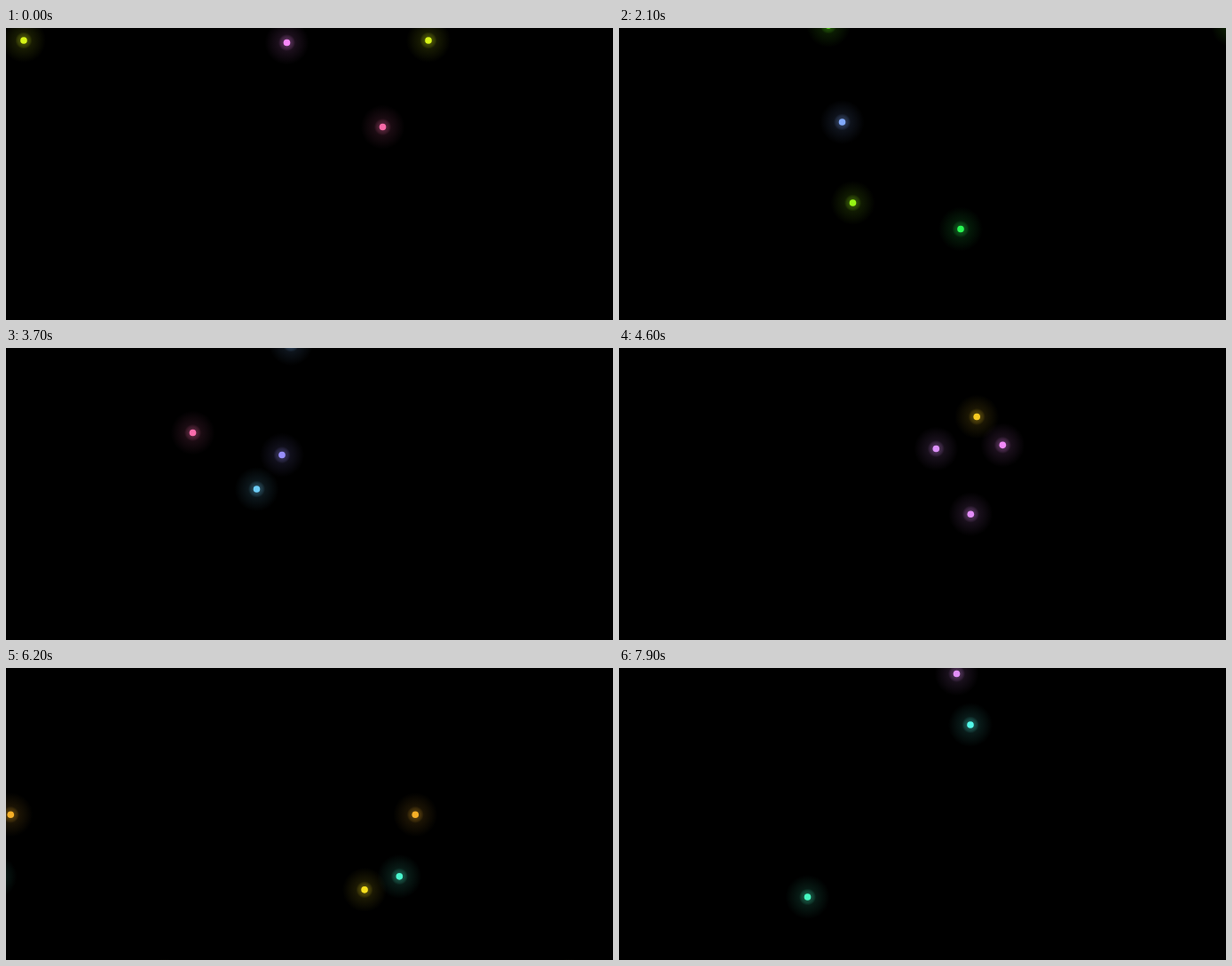
Recreate the animation shown at these times as an HTML page with a canvas. Size 684 by 329 pixels, loop 8000 ms.

```html
<!DOCTYPE html>
<html lang="en">
<head>
<meta charset="utf-8">
<title>Drifting lights</title>
<style>
  html, body { margin: 0; width: 100%; height: 100%; overflow: hidden; background: #000; }
  canvas { display: block; }
</style>
</head>
<body>
<canvas id="stage" width="684" height="329"></canvas>
<script>
const canvas = document.getElementById('stage');
const ctx = canvas.getContext('2d');
const LOOP = 8000, STEP = 100;
const TILE = 456;        // every light is repeated this far to the left
const CORE = 3.8, HALO = 25;
const HUE_RATE = 7.2;    // degrees per step, the same for all lights

// All lights pass their waypoints at the same steps
const times = [0, 10, 20, 36, 55, 66, 78];
const lights = [
  { hue: 80, path: [[476, 14], [550.5, 208.5], [251.5, 106], [210.5, 95.5], [591, 94], [300.5, 316], [380.5, 6.5]] },
  { hue: 310, path: [[316.5, 16.5], [601, 242], [263.5, 197], [282.5, 159], [442.5, 89.5], [438, 236.5], [212.5, 258]] },
  { hue: 340, path: [[424.5, 111.5], [439, 183], [385, 226.5], [311, 120.5], [545, 140.5], [282, 310.5], [396, 64]] },
  { hue: -40, path: [[720, -220], [720, -140], [692, -3], [321, -5], [560, 400], [660, 303], [500, 480]] }
];

const cosDeg = degrees => Math.cos(degrees * Math.PI / 180);

function slope(path, i, axis) {
  const before = Math.max(i - 1, 0), after = Math.min(i + 1, path.length - 1);
  return (path[after][axis] - path[before][axis]) / (times[after] - times[before]);
}

// Cubic Hermite curve through the waypoints
function pointAt(path, step) {
  let i = 0;
  while (i < times.length - 2 && times[i + 1] <= step) i++;
  const span = times[i + 1] - times[i];
  const u = (step - times[i]) / span, v = 1 - u;
  return [0, 1].map(axis =>
    path[i][axis] * v * v * (1 + 2 * u) + path[i + 1][axis] * u * u * (1 + 2 * v) +
    span * u * v * (slope(path, i, axis) * v - slope(path, i + 1, axis) * u));
}

function disc(x, y, radius, fill) {
  ctx.fillStyle = fill;
  ctx.beginPath();
  ctx.arc(x, y, radius, 0, 2 * Math.PI);
  ctx.fill();
}

function drawLight(x, y, angle) {
  // The wheel lingers on orange, green and violet; blues and pinks are paler
  const hue = angle + 12 * cosDeg(3 * (angle - 20));
  const lightness = 65 - 13 * cosDeg(hue - 85);
  const tint = alpha => `hsla(${hue % 360}, 92%, ${lightness}%, ${alpha})`;
  const halo = ctx.createRadialGradient(x, y, 0, x, y, HALO);
  halo.addColorStop(0, tint(0.45));
  halo.addColorStop(0.3, tint(0.22));
  halo.addColorStop(0.38, tint(0.11));
  halo.addColorStop(1, tint(0));
  disc(x, y, HALO, halo);
  disc(x, y, CORE, tint(1));
}

function draw(now) {
  // The opening pose is held for two steps
  const step = Math.max(0, Math.floor(now % LOOP / STEP) - 1);
  ctx.fillStyle = '#000';
  ctx.fillRect(0, 0, canvas.width, canvas.height);
  for (const { hue, path } of lights) {
    const [x, y] = pointAt(path, step);
    const angle = hue + HUE_RATE * step;
    drawLight(x, y, angle);
    drawLight(x - TILE, y, angle);
  }
}

let start;
function tick(now) {
  start ??= now;
  draw(now - start);
  requestAnimationFrame(tick);
}
requestAnimationFrame(tick);
</script>
</body>
</html>
```
